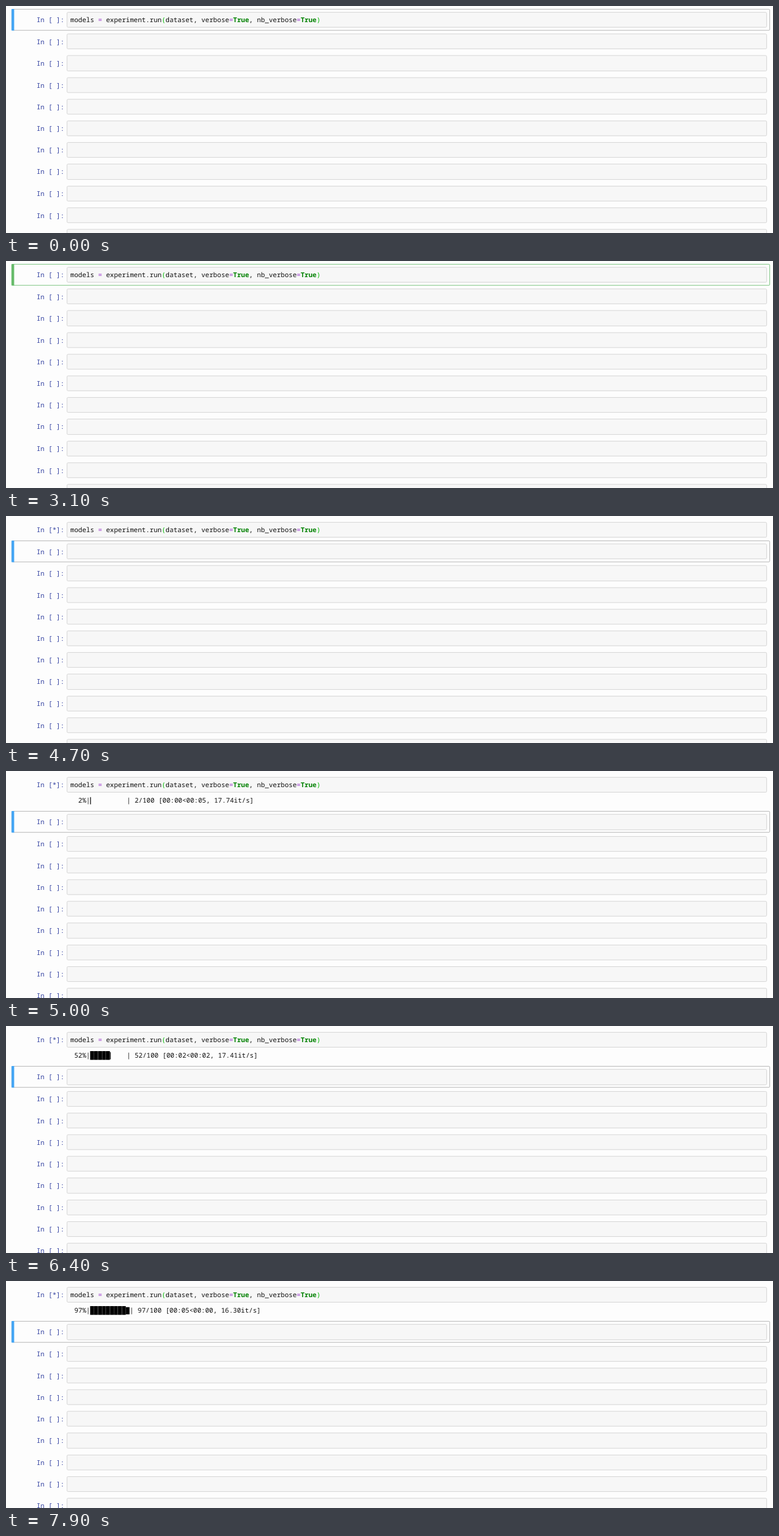
An HTML page for the animation above (8 s loop, 1280 px wide and 380 px high).

```html
<!DOCTYPE html>
<html lang="en">
<head>
<meta charset="utf-8">
<title>Notebook progress</title>
<style>
  html, body { margin: 0; width: 100%; height: 100%; overflow: hidden; background: #fdfdfd; }
  svg { display: block; width: 1280px; height: 380px; }
  text {
    font: 12.83px "Noto Sans Mono", "DejaVu Sans Mono", monospace;
    text-rendering: geometricPrecision;
    white-space: pre;
    fill: #111;
  }
  .input { fill: #f7f7f7; stroke: #cfcfcf; }
  .prompt { fill: #303f9f; }
  .op { fill: #93c; }
  .kw { fill: #008000; font-weight: bold; }
  .match { fill: #0b0; }
</style>
</head>
<body>
<svg viewBox="0 0 1280 380">
  <g id="page" transform="translate(9.3 5) scale(.861)"></g>
</svg>
<script>
const LOOP = 8000, TICK = 100;
const EDIT = 100, RUN = 4700, OUTPUT = 5000;
const BLINKS = [3100, 3700, 3900, 4200, 4500];
const PAUSES = [6100, 6300, 6600, 6900, 7500];

// Notebook layout in page units; rows snap to whole units.
const ROWS = 11, PITCH = 42.2, BOX_HEIGHT = 30.2, OUTPUT_HEIGHT = 30.15;
const WIDTH = 1470, LEFT = 113.8, CHAR = 7.7, BASELINE = 26;
const BAR_LEFT = LEFT + 5 * CHAR, BAR_TOP = 43, BAR_CELLS = 10, EIGHTH = 1.5;

// [time, finished iterations, iterations per second]
const KEYS = [[5000, 2, 17.74], [5700, 27, 17.9], [6400, 52, 17.41], [7900, 97, 16.3]];

const page = document.getElementById("page");

function set(el, attrs) {
  for (const key in attrs) el.setAttribute(key, attrs[key]);
}

function add(tag, attrs = {}, parent = page) {
  const el = document.createElementNS("http://www.w3.org/2000/svg", tag);
  set(el, attrs);
  parent.appendChild(el);
  return el;
}

function show(el, on) {
  el.style.display = on ? "" : "none";
}

const selection = add("g");
const outline = add("rect", { x: 0.5, y: 0.5, width: WIDTH - 1, height: 41, rx: 2, fill: "none" }, selection);
const marker = add("rect", { width: 5, height: 42 }, selection);

const cells = Array.from({ length: ROWS }, () => ({
  box: add("rect", { class: "input", x: 107.5, width: WIDTH - 114, rx: 2 }),
  prompt: add("text", { class: "prompt", x: 48.4 })
}));

const code = add("text", { x: LEFT, y: BASELINE });
[
  ["models "], ["=", "op"], [" experiment.run"], ["(", "match"],
  ["dataset, verbose"], ["=", "op"], ["True", "kw"], [", nb_verbose"],
  ["=", "op"], ["True", "kw"], [")", "match"]
].forEach(([word, kind = ""]) => {
  add("tspan", { class: kind }, code).textContent = word;
});
const caret = add("rect", { x: LEFT + 63 * CHAR, y: 13, width: 1, height: 17 });

const output = add("g");
const percent = add("text", { x: LEFT, y: BAR_TOP + 13 }, output);
const status = add("text", { y: BAR_TOP + 13 }, output);
const blocks = Array.from({ length: BAR_CELLS }, (_, i) =>
  add("rect", { x: BAR_LEFT + i * CHAR, y: BAR_TOP, width: CHAR - 0.3, height: 17 }, output));
const partial = add("rect", { y: BAR_TOP + 2, height: 14 }, output);

const clock = seconds => "00:" + String(Math.floor(seconds)).padStart(2, "0");

function rowOffset(i, t) {
  return PITCH * i + (i > 0 && t >= OUTPUT ? OUTPUT_HEIGHT : 0);
}

function progressAt(t) {
  let time = Math.floor(t / TICK) * TICK;
  if (PAUSES.includes(time)) time -= TICK;
  let i = 1;
  while (i < KEYS.length - 1 && time > KEYS[i][0]) i++;
  const a = KEYS[i - 1], b = KEYS[i];
  const f = (time - a[0]) / (b[0] - a[0]);
  return { n: Math.round(a[1] + (b[1] - a[1]) * f), rate: a[2] + (b[2] - a[2]) * f };
}

function drawCells(t) {
  cells.forEach(({ box, prompt }, i) => {
    const offset = rowOffset(i, t);
    const top = Math.round(offset);
    const bottom = Math.round(offset + BOX_HEIGHT);
    set(box, { y: top + 6.5, height: bottom - top - 1 });
    set(prompt, { y: top + BASELINE });
    prompt.textContent = t >= RUN && i === 0 ? "In [*]:" : "In [ ]:";
  });
}

function drawSelection(t) {
  const editing = t >= EDIT && t < RUN;
  const row = t < RUN ? 0 : 1;
  set(selection, { transform: `translate(0 ${Math.round(rowOffset(row, t))})` });
  set(outline, { stroke: editing ? "#66bb6a" : "#ababab" });
  set(marker, { fill: editing ? "#66bb6a" : "#42a5f5" });
  const toggles = BLINKS.filter(time => time <= t).length;
  show(caret, editing && toggles % 2 === 0);
}

function drawProgress(t) {
  show(output, t >= OUTPUT);
  if (t < OUTPUT) return;
  const { n, rate } = progressAt(t);
  const eighths = Math.floor(n * BAR_CELLS * 8 / 100);
  const full = eighths >> 3, rest = eighths & 7;
  const restWidth = rest * EIGHTH;
  blocks.forEach((block, i) => show(block, i < full));
  show(partial, rest > 0);
  set(partial, { x: BAR_LEFT + full * CHAR, width: Math.max(1.4, restWidth - 0.4) });

  // A partial block is narrower or wider than a character and moves the rest of the line.
  const barWidth = (BAR_CELLS - 1) * CHAR + (rest ? restWidth : CHAR);
  percent.textContent = String(n).padStart(3) + "%|";
  set(status, { x: BAR_LEFT + barWidth });
  status.textContent =
    `| ${n}/100 [${clock(n / 17.6)}<${clock((100 - n) / rate)}, ${rate.toFixed(2)}it/s]`;
}

function draw() {
  const t = performance.now() % LOOP;
  drawCells(t);
  drawSelection(t);
  drawProgress(t);
  requestAnimationFrame(draw);
}
draw();
</script>
</body>
</html>
```
